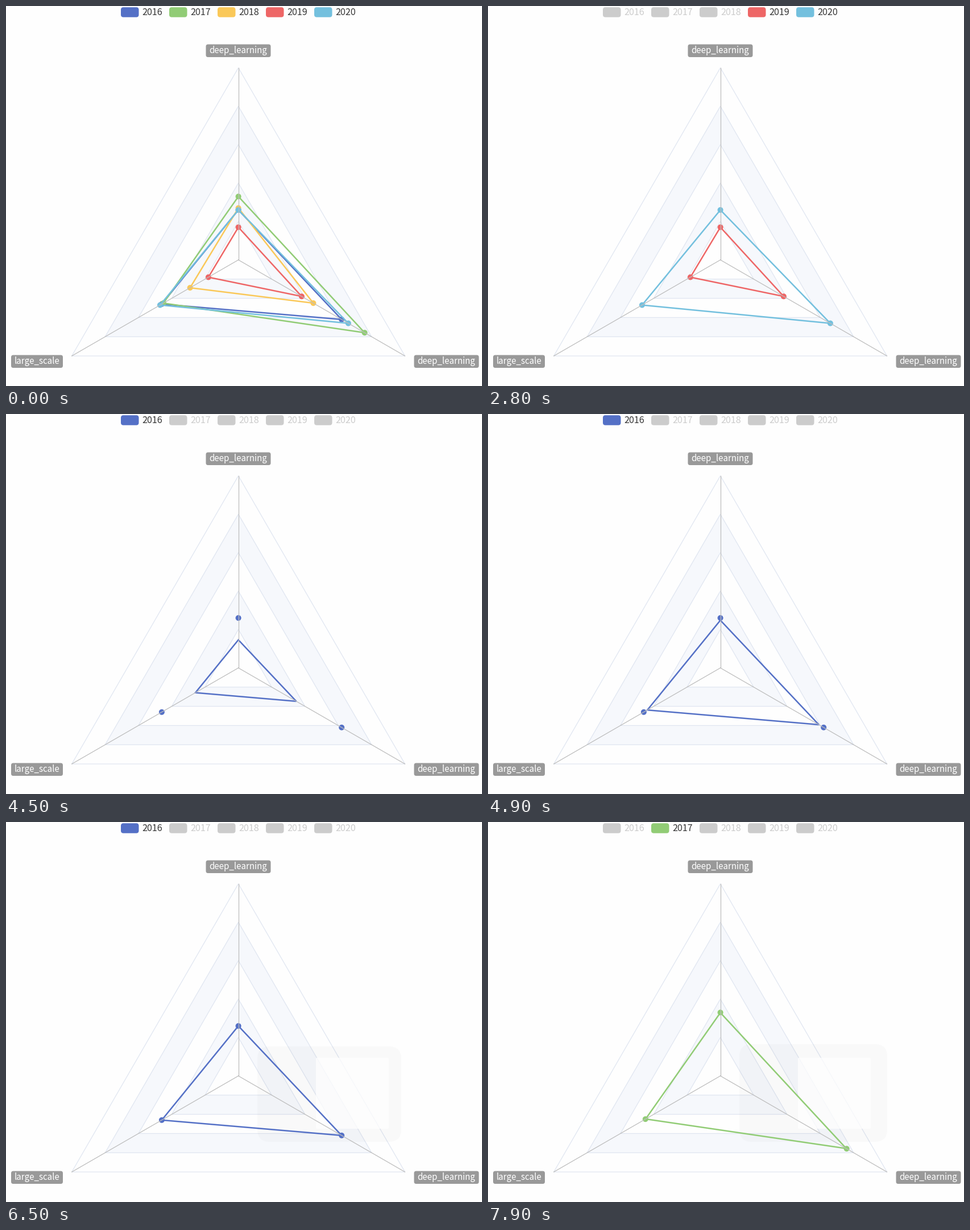
Animation of 837x669 px, one loop 8 s. Source, as a matplotlib script:

```python
import math

import matplotlib.pyplot as plt
from matplotlib.animation import FuncAnimation
from matplotlib.patches import Circle, FancyBboxPatch, Polygon

W, H = 837, 669
FRAMES, INTERVAL = 80, 100
CX, CY, RADIUS = 408.6, 447, 338.2
FONT = "Noto Sans CJK JP"
BG, AREA, GRID, AXIS, MUTED = "#fefefe", "#f6f8fc", "#e0e6f1", "#bdbdbd", "#cccccc"

AXES = ["deep_learning", "large_scale", "deep_learning"]
ANGLES = [math.radians(a) for a in (90, 210, 330)]
LABEL_BOXES = [(351.5, 67.5, 114), (9, 614.5, 91), (717.5, 614.5, 114)]

# name: color, values (top, left, right; axis maximum 10)
SERIES = {
    "2016": ("#5470c6", (2.6, 4.6, 6.2)),
    "2017": ("#91cc75", (3.3, 4.5, 7.58)),
    "2018": ("#fac858", (2.7, 2.9, 4.5)),
    "2019": ("#ee6666", (1.7, 1.8, 3.8)),
    "2020": ("#73c0de", (2.6, 4.7, 6.6)),
}
HIDE_AT = {"2016": 1300, "2017": 2100, "2018": 2700, "2019": 3100, "2020": 3500}
# name: (legend switches on, line starts to grow, legend switches off)
SOLO = {"2016": (4200, 4260, 6700), "2017": (7000, 7040, 8000)}
GROW_MS = 1000

# start, end, fade in, fade out, series, dx, dy
TOOLTIPS = [
    (5100, 5400, 150, 150, "2016", 0, 0),
    (5600, 6100, 250, 150, "2016", 2, 0),
    (7600, 7900, 150, 100, "2017", 12, -2),
]

# dpi 72 makes one point equal to one pixel
fig = plt.figure(figsize=((W + 0.01) / 72, (H + 0.01) / 72), dpi=72, facecolor=BG)
ax = fig.add_axes([0, 0, 1, 1])


def spot(angle, fraction):
    r = RADIUS * fraction
    return CX + r * math.cos(angle), CY - r * math.sin(angle)


def triangle(fractions):
    return [spot(a, f) for a, f in zip(ANGLES, fractions)]


def box(x, y, w, h, radius, color, edge="none", lw=0, alpha=1):
    ax.add_patch(FancyBboxPatch(
        (x, y), w, h, boxstyle=f"round,pad=0,rounding_size={radius}",
        fc=color, ec=edge, lw=lw, alpha=alpha))


def text(x, baseline, label, size, color, **kw):
    ax.text(x, baseline, label, fontsize=size, color=color, family=FONT,
            va="baseline", **kw)


def state(name, t):
    """Return (visible, growth of the line)."""
    if t < HIDE_AT[name]:
        return True, 1
    if name in SOLO:
        on, start, off = SOLO[name]
        if on <= t < off:
            u = min(max((t - start) / GROW_MS, 0), 1)
            return True, 1 - (1 - u) ** 3
    return False, 0


def draw_grid():
    for k in range(5, 0, -1):
        ax.add_patch(Polygon(triangle([k / 5] * 3), fc=BG if k % 2 else AREA,
                             ec=GRID, lw=1.25, joinstyle="miter"))
    for angle in ANGLES:
        x, y = spot(angle, 1)
        ax.plot([CX, x], [CY, y], color=AXIS, lw=1.25)
    for label, (x, y, w) in zip(AXES, LABEL_BOXES):
        box(x, y, w, 22.5, 3.75, "#999999")
        text(x + w / 2, y + 15.6, label, 15.1, "white", ha="center")


def draw_legend(t):
    for i, (name, (color, _)) in enumerate(SERIES.items()):
        x = 202 + 85 * i
        on = state(name, t)[0]
        box(x, 2.2, 31.5, 17.5, 4.4, color if on else MUTED)
        text(x + 37, 15.5, name, 16.2, "#333333" if on else MUTED)


def draw_series(name, growth):
    color, values = SERIES[name]
    if growth > 0:
        ax.add_patch(Polygon(triangle([v / 10 * growth for v in values]), fill=False,
                             ec=color, lw=2.5, joinstyle="miter"))
    for point in triangle([v / 10 for v in values]):
        ax.add_patch(Circle(point, 5, fc=color, ec="none"))


def draw_trace(t):
    """Faint shade that stays behind once a tooltip has closed."""
    if t < 5400:
        return
    if t < 6100:
        x2, y1, y2 = 690, 395, 557
    elif t < 7900:
        x2, y1, y2 = 695, 395, 563
    else:
        x2, y1, y2 = 702, 391, 563
    box(442, y1, x2 - 442, y2 - y1, 22, "black", alpha=0.018)
    if t >= 6100:
        box(545, 415, 128, 125, 2, "white", alpha=0.75)


def draw_tooltip(name, dx, dy, alpha):
    color, values = SERIES[name]
    x, y, w, h = 459 + dx, 409 + dy, 215, 132
    for grow in range(1, 13, 2):
        box(x + 1.25 - grow, y + 2.5 - grow, w + 2 * grow, h + 2 * grow,
            5 + grow, "black", alpha=0.018 * alpha)
    box(x, y, w, h, 5, "white", color, 1.25, alpha)
    text(x + 13.5, y + 28, name, 17.6, "#666666", alpha=alpha)
    for i, (label, value) in enumerate(zip(AXES, values)):
        mid = y + 51.5 + 29.5 * i
        ax.add_patch(Circle((x + 19.5, mid), 6.25, fc=color, ec="none", alpha=alpha))
        text(x + 32, mid + 6, label, 17.6, "#666666", alpha=alpha)
        text(x + w - 13.5, mid + 6, f"{value:.1f}", 17.6, "#666666",
             ha="right", weight="bold", alpha=alpha)


def draw(frame):
    t = frame * INTERVAL
    ax.clear()
    ax.set_xlim(0, W)
    ax.set_ylim(H, 0)
    ax.axis("off")
    draw_grid()
    draw_legend(t)
    draw_trace(t)
    for name in SERIES:
        visible, growth = state(name, t)
        if visible:
            draw_series(name, growth)
    for start, end, fade_in, fade_out, name, dx, dy in TOOLTIPS:
        if start <= t < end:
            alpha = min((t - start + 60) / fade_in, (end - t) / fade_out, 1)
            draw_tooltip(name, dx, dy, alpha)
    return []


anim = FuncAnimation(fig, draw, frames=FRAMES, interval=INTERVAL,
                     repeat=True, repeat_delay=0, blit=False)
plt.show()
```
